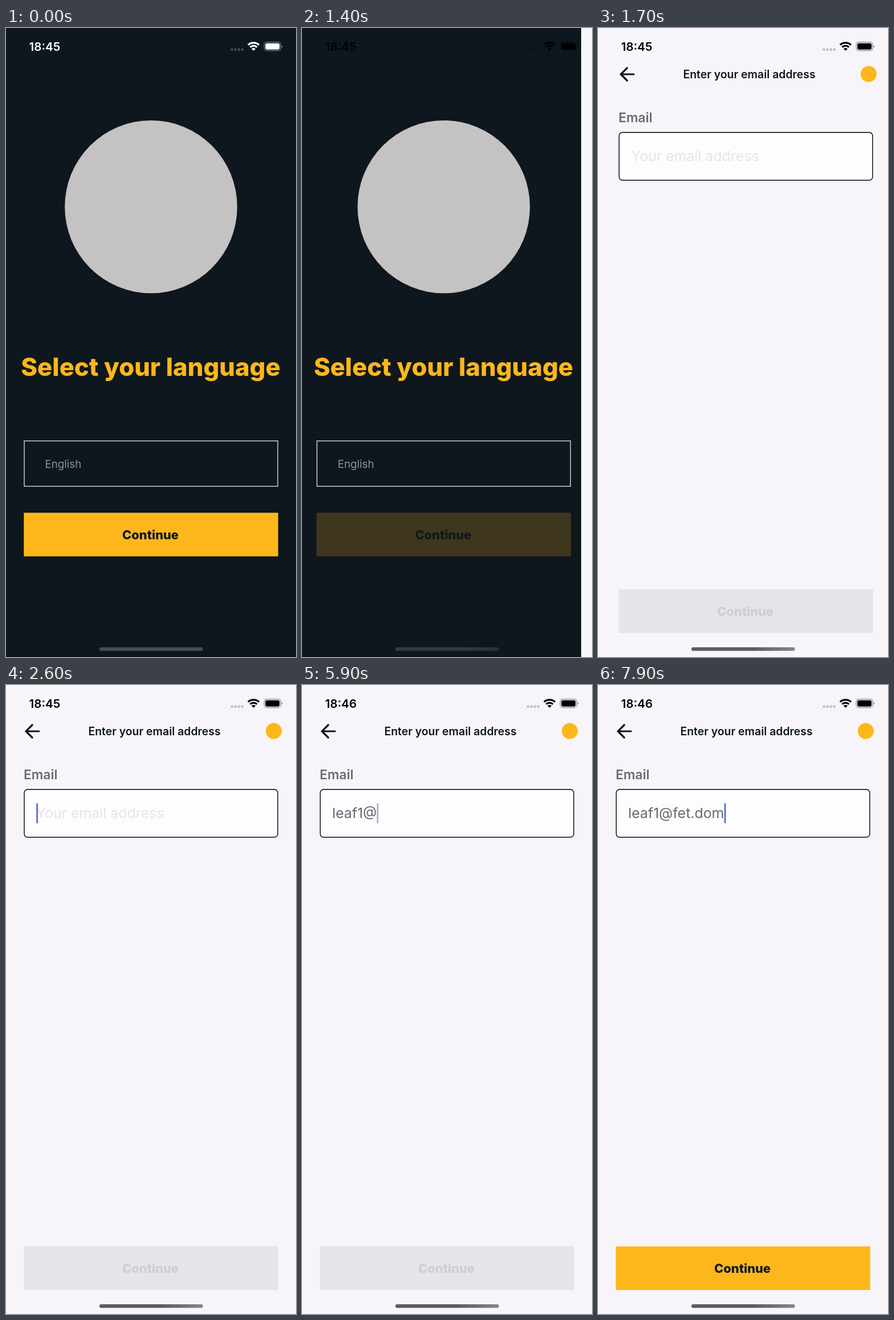
An HTML page for the animation above (8 s loop, 509 px wide and 1101 px high).

```html
<!DOCTYPE html>
<html lang="en">
<head>
<meta charset="utf-8">
<title>Sign-in flow</title>
<style>
  html, body { margin: 0; width: 100%; height: 100%; overflow: hidden; background: #f7f5f9; }
  svg { display: block; font-family: Inter, "Open Sans", sans-serif; }
  .mid { text-anchor: middle; }
  .bold { font-weight: 800; }
  .semi { font-weight: 600; }
</style>
</head>
<body>
<svg width="509" height="1101" viewBox="0 0 509 1101">
  <defs>
    <linearGradient id="barDark"><stop offset=".6" stop-color="#38393d"/><stop offset="1" stop-color="#2b2f34"/></linearGradient>
    <linearGradient id="barLight"><stop offset=".6" stop-color="#5d5b60"/><stop offset="1" stop-color="#88868b"/></linearGradient>
  </defs>

  <g id="language">
    <rect width="700" height="1101" fill="#0f171e"/>
    <circle cx="254.5" cy="313" r="151.3" fill="#c5c2c4"/>
    <text class="mid bold" x="254" y="609" font-size="43.6" fill="#fdb71a">Select your language</text>
    <rect x="32" y="722.7" width="445" height="79.5" fill="none" stroke="#d8d5da" stroke-width="1.4"/>
    <text x="68.5" y="769.5" font-size="18.7" fill="#929297">English</text>
    <g id="pressed">
      <rect x="31.3" y="848.5" width="446.4" height="76.3" fill="#fdb71a"/>
      <text class="mid bold" x="253.5" y="894.5" font-size="21.8" fill="#0f171e">Continue</text>
    </g>
  </g>

  <g id="email">
    <rect width="509" height="1101" fill="#f7f5f9"/>
    <path d="M59 81H35.5M47 69L35 81L47 93" fill="none" stroke="#0f171e" stroke-width="3.2"/>
    <text class="mid semi" x="260.5" y="87.5" font-size="19.4" fill="#0f171e">Enter your email address</text>
    <circle cx="470" cy="80.5" r="14" fill="#fdb71a"/>
    <text class="semi" x="31" y="164.5" font-size="22.8" fill="#6e6a70">Email</text>
    <rect x="32" y="182.7" width="445" height="83.8" rx="6" fill="#fefcff" stroke="#000" stroke-width="1.4"/>
    <text id="field" x="53" y="233" font-size="24.9"></text>
    <rect id="caret" y="207" width="2.6" height="35" rx="1" fill="#3f6bc6"/>
    <rect id="submit" x="31.3" y="982.7" width="446.4" height="76.3"/>
    <text id="submitText" class="mid bold" x="253.5" y="1028.5" font-size="21.8">Continue</text>
  </g>

  <g id="status" fill="currentColor">
    <text id="clock" class="semi" x="40.5" y="40" font-size="20.6"></text>
    <path d="M394.5 37.7h22.6" stroke="currentColor" stroke-width="4" stroke-dasharray="4.2 1.9" opacity=".22"/>
    <g id="wifi" transform="translate(434.5 40)" fill="none" stroke="currentColor"></g>
    <rect x="453.2" y="24.7" width="29" height="15" rx="4.3" fill="none" stroke="currentColor" stroke-width="1.2" opacity=".45"/>
    <rect x="455.2" y="26.7" width="25" height="11" rx="2.6"/>
    <path d="M483.6 29.8q1.8 .8 1.8 2.4t-1.8 2.4z" opacity=".45"/>
  </g>
  <rect id="homeBar" x="164" y="1084" width="181.5" height="6.3" rx="3.15"/>
</svg>
<script>
const $ = id => document.getElementById(id);
const LOOP = 8000, STEP = 100, WIDTH = 509;
const ADDRESS = 'leaf1@fet.dom';
const FOCUS = 2600, VALID = 6800;

// [time, characters typed so far]
const KEYS = [[3200, 2], [3400, 3], [3600, 4], [4400, 5], [5400, 6], [6000, 8],
              [6300, 9], [6500, 10], [6700, 11], [6800, 12], [6900, 13]];
// Values per step, starting at the tap
const TAP = 1300, COVERED = 1700;
const SLIDE = [509, 490, 123, 25, 5, 1, 0];
const PRESS = [.5, .2, .75, 1];

const arc = (r, width) => {
  const x = r * Math.sin(.75), y = -r * Math.cos(.75);
  return `<path d="M${-x} ${y}A${r} ${r} 0 0 1 ${x} ${y}" stroke-width="${width}"/>`;
};
$('wifi').innerHTML = arc(14.2, 3.2) + arc(8.8, 3.2) +
  '<path d="M0 0L-3.5 -3.7A5.1 5.1 0 0 1 3.5 -3.7Z" fill="currentColor" stroke="none"/>';

function atStep(values, t, before) {
  const i = Math.floor((t - TAP) / STEP);
  return i < 0 ? before : values[Math.min(i, values.length - 1)];
}

// Solid after each key, then half, hidden, half within a one second cycle
function caretOpacity(sinceKey) {
  const phase = sinceKey % 1000;
  if (phase < 500) return 1;
  return phase < 600 || phase >= 900 ? .55 : 0;
}

function draw(t) {
  const offset = atStep(SLIDE, t, WIDTH);
  $('email').setAttribute('transform', `translate(${offset} 0)`);
  $('language').setAttribute('transform', `translate(${(offset - WIDTH) * .3} 0)`);
  $('language').setAttribute('visibility', t < COVERED ? 'visible' : 'hidden');
  $('pressed').setAttribute('opacity', atStep(PRESS, t, 1));

  const [keyTime, count] = KEYS.filter(key => key[0] <= t).pop() || [FOCUS, 0];
  const field = $('field');
  field.textContent = count ? ADDRESS.slice(0, count) : 'Your email address';
  field.setAttribute('fill', count ? '#6c686f' : '#e7e4e9');
  $('caret').setAttribute('x', 53.3 + (count ? field.getComputedTextLength() : 0));
  $('caret').setAttribute('opacity', t < FOCUS ? 0 : caretOpacity(t - keyTime));

  const valid = t >= VALID;
  $('submit').setAttribute('fill', valid ? '#fdb71a' : '#e6e4e9');
  $('submitText').setAttribute('fill', valid ? '#0f171e' : '#cfcdd2');

  $('clock').textContent = t < 4000 ? '18:45' : '18:46';
  $('status').style.color = t < 1400 ? '#fff' : '#000';
  $('homeBar').setAttribute('fill', t < 1400 ? '#4a4a4c' : t < 1500 ? 'url(#barDark)' : 'url(#barLight)');
}

function frame() {
  const t = performance.now() % LOOP;
  draw(Math.floor(t / STEP) * STEP);
  requestAnimationFrame(frame);
}
frame();
</script>
</body>
</html>
```
